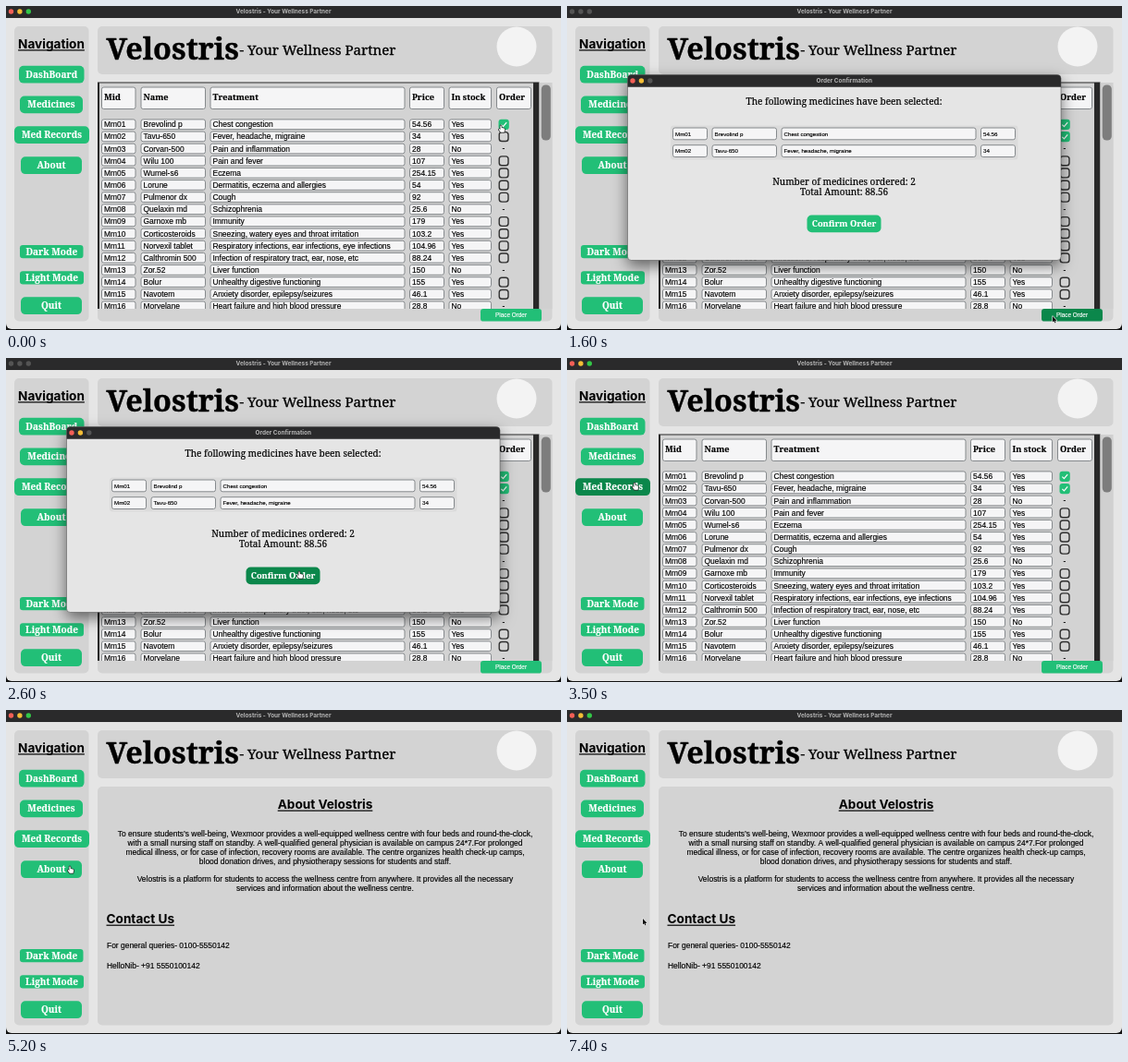
Write an HTML page with a canvas that moves like this. It is 600 px wide and 351 px high and loops after 7.5 s.

```html
<!DOCTYPE html>
<html lang="en">
<head>
<meta charset="utf-8">
<title>Velostris - Your Wellness Partner</title>
<style>
html, body { margin: 0; width: 100%; height: 100%; overflow: hidden; background: #111; }
canvas { display: block; width: 600px; height: 351px; }
</style>
</head>
<body>
<canvas id="stage"></canvas>
<script>
const LOOP = 7500, STEP = 100;
const canvas = document.getElementById('stage');
const ratio = window.devicePixelRatio || 1;
canvas.width = 600 * ratio;
canvas.height = 351 * ratio;
const ctx = canvas.getContext('2d');

const SANS = '"Liberation Sans", Arial, sans-serif';
const UI = 'Inter, Roboto, sans-serif';
const SLAB = '"Noto Serif", "DejaVu Serif", serif';
const GREEN = '#22bf77', DARK_GREEN = '#0b874b', PANEL = '#d3d3d3', PAGE = '#e5e5e5';
const INK = '#000', BAR = '#2a2a2b';
const BRAND = 'Velostris';

// id, name, treatment, price, in stock
const medicines = [
  ['Mm01', 'Brevolind p', 'Chest congestion', '54.56', 'Yes'],
  ['Mm02', 'Tavu-650', 'Fever, headache, migraine', '34', 'Yes'],
  ['Mm03', 'Corvan-500', 'Pain and inflammation', '28', 'No'],
  ['Mm04', 'Wilu 100', 'Pain and fever', '107', 'Yes'],
  ['Mm05', 'Wumel-s6', 'Eczema', '254.15', 'Yes'],
  ['Mm06', 'Lorune', 'Dermatitis, eczema and allergies', '54', 'Yes'],
  ['Mm07', 'Pulmenor dx', 'Cough', '92', 'Yes'],
  ['Mm08', 'Quelaxin md', 'Schizophrenia', '25.6', 'No'],
  ['Mm09', 'Garnoxe mb', 'Immunity', '179', 'Yes'],
  ['Mm10', 'Corticosteroids', 'Sneezing, watery eyes and throat irritation', '103.2', 'Yes'],
  ['Mm11', 'Norvexil tablet', 'Respiratory infections, ear infections, eye infections', '104.96', 'Yes'],
  ['Mm12', 'Calthromin 500', 'Infection of respiratory tract, ear, nose, etc', '88.24', 'Yes'],
  ['Mm13', 'Zor.52', 'Liver function', '150', 'No'],
  ['Mm14', 'Bolur', 'Unhealthy digestive functioning', '155', 'Yes'],
  ['Mm15', 'Navotem', 'Anxiety disorder, epilepsy/seizures', '46.1', 'Yes'],
  ['Mm16', 'Morvelane', 'Heart failure and high blood pressure', '28.8', 'No']
];
const extra = [
  ['Mm71', 'Sulore-f cream', 'Skin inflammtion and itching', '265'],
  ['Mm25', 'Zelmic', 'Heartburn, indigestion', '32.75'],
  ['Mm26', 'Fonarel', 'Headache, toothache, muscle pain and fever', '13'],
  ['Mm27', 'Mulora', 'Acidity and gas', '185'],
  ['Mm58', 'Bentorix', 'Stomach and intestine', '37.5']
];
const byId = new Map([...medicines, ...extra].map(m => [m[0], m.slice(0, 4)]));
const records = [
  ['Mm01', '2022-12-18 06:19:49'], ['Mm09', '2022-12-18 06:40:57'],
  ['Mm10', '2022-12-18 06:40:57'], ['Mm04', '2022-12-18 15:59:04'],
  ['Mm05', '2022-12-18 15:59:04'], ['Mm71', '2022-12-19 06:22:50'],
  ['Mm25', '2022-12-20 06:12:06'], ['Mm26', '2022-12-20 06:12:06'],
  ['Mm27', '2022-12-20 06:12:06'], ['Mm02', '2023-01-07 07:16:14'],
  ['Mm58', '2023-08-24 07:20:28'], ['Mm01', '2023-08-24 10:12:48'],
  ['Mm02', '2023-08-24 10:12:48']
].map(([id, time]) => [...byId.get(id), time]);

// label, x, y, width, height
const navButtons = [
  ['DashBoard', 14, 64.8, 70.5, 18.8], ['Medicines', 15, 97.5, 68, 18.8],
  ['Med Records', 9, 130.3, 81, 18.8], ['About', 16, 163.3, 66, 18.8],
  ['Dark Mode', 15, 259, 68.5, 14.2], ['Light Mode', 15, 287.2, 69, 14.2],
  ['Quit', 16, 315.3, 66, 18.8]
];
const ORDER_BTN = [513, 328.1, 66, 13.5];
const CONFIRM_BTN = [259.5, 226.5, 80, 18.8];

// time, x, y of the pointer
const path = [
  [0, 536, 133], [200, 537, 139], [300, 538, 142], [700, 538, 143], [1300, 525, 336],
  [1700, 525, 336], [2300, 318, 235], [2700, 318, 235], [3300, 74, 139],
  [3900, 74, 139], [4200, 127, 152], [4500, 150, 170], [4700, 142, 174],
  [5000, 70, 173], [5900, 70, 173], [6400, 76, 196], [7100, 82, 226], [7500, 82, 226]
];

function rr(x, y, w, h, r, fill, stroke, line = 1) {
  ctx.beginPath();
  ctx.roundRect(x, y, w, h, r);
  if (fill) { ctx.fillStyle = fill; ctx.fill(); }
  if (stroke) { ctx.strokeStyle = stroke; ctx.lineWidth = line; ctx.stroke(); }
}
function rect(x, y, w, h, fill) {
  ctx.fillStyle = fill;
  ctx.fillRect(x, y, w, h);
}
function dot(x, y, r, fill) {
  ctx.beginPath();
  ctx.arc(x, y, r, 0, Math.PI * 2);
  ctx.fillStyle = fill;
  ctx.fill();
}
// weight adds a thin outline for a slightly heavier face
function text(s, x, y, font, fill = INK, align = 'left', weight = 0) {
  ctx.font = font;
  ctx.textAlign = align;
  ctx.fillStyle = fill;
  ctx.fillText(s, x, y);
  if (!weight) return;
  ctx.strokeStyle = fill;
  ctx.lineWidth = weight;
  ctx.lineJoin = 'round';
  ctx.strokeText(s, x, y);
}
function heading(s, x, y, align = 'center') {
  text(s, x, y, `700 13.6px ${UI}`, INK, align);
  const w = ctx.measureText(s).width;
  rect(align === 'center' ? x - w / 2 : x, y + 1.8, w, 1.2, INK);
}
function button(label, [x, y, w, h], dark, font, drop = 3.4) {
  rr(x, y, w, h, h > 16 ? 5 : 3.2, dark ? DARK_GREEN : GREEN);
  text(label, x + w / 2, y + h / 2 + drop, font, '#fff', 'center', .15);
}
function field(x, y, w, h, s, font, drop) {
  rr(x + .5, y + .5, w - 1, h - 1, 2.2, '#f5f5f6', '#85898c', 1);
  text(s, x + 3, y + h / 2 + drop, font, INK, 'left', .15);
}
function headers(cols, labels, y, h) {
  labels.forEach((s, i) => field(cols[i][0], y, cols[i][1], h, s, `600 9.2px ${SLAB}`, h > 20 ? 2.4 : 3));
}
function row(cols, cells, y) {
  cells.forEach((s, i) => field(cols[i][0], y - 5.8, cols[i][1], 11.7, s, `8.45px ${SANS}`, 3));
}

function titleBar(x, y, w, h, label, lights) {
  const mid = y + h / 2;
  lights.forEach((c, i) => dot(x + 5.5 + i * 9.4, mid, 2.7, c));
  text(label, x + w / 2, mid + 2.2, `700 6.4px ${UI}`, '#b4b4b4', 'center');
}

function frame(t, modal) {
  rect(0, 0, 600, 351, '#111');
  rr(0, 0, 600, 350, [0, 0, 6, 6], PAGE);
  rect(0, 0, 600, 13, BAR);
  const off = '#545454';
  titleBar(0, 0, 600, 12, BRAND + ' - Your Wellness Partner',
    modal ? [off, off, off] : ['#f45f56', '#f4bd35', '#33c748']);
  rr(9, 22, 80.5, 319.5, 5, PANEL);
  rr(99, 22, 491.5, 52, 5, PANEL);
  rr(99, 83, 491.5, 258.5, 5, PANEL);
  heading('Navigation', 49, 45.5);
  for (const [label, ...box] of navButtons) {
    const dark = label === 'Med Records' && t >= 3200 && t < 4300 ||
                 label === 'About' && t >= 5000 && t < 5200;
    button(label, box, dark, `700 10px ${SLAB}`);
  }
  text(BRAND, 108.5, 57.8, `700 32.4px ${SLAB}`, INK, 'left', .4);
  text('- Your Wellness Partner', 252.5, 52.5, `500 15.1px ${SLAB}`, INK, 'left', .3);
  dot(552, 44, 21.5, '#f3f3f3');
}

function checkbox(y, on) {
  if (!on) return rr(533.2, y - 4.7, 9.8, 9.8, 2.8, null, '#303030', 1.4);
  rr(532.5, y - 5.4, 11.3, 11.3, 3, GREEN);
  ctx.beginPath();
  ctx.moveTo(535.4, y + .5);
  ctx.lineTo(537.4, y + 2.5);
  ctx.lineTo(541.2, y - 2);
  ctx.strokeStyle = '#fff';
  ctx.lineWidth = 1.2;
  ctx.stroke();
}

function medicinePage(t) {
  const cols = [[103, 37.5], [145.5, 70.5], [220.5, 211], [436, 38], [478.5, 46.5], [530, 38]];
  rect(99, 82.5, 477.5, 245.5, '#282828');
  rect(101, 83.5, 469, 244.5, PANEL);
  rect(576.5, 83, 14, 245, '#d0d0d0');
  rr(578.8, 85.5, 10, 60, 4.5, '#7d7d7d');
  headers(cols, ['Mid', 'Name', 'Treatment', 'Price', 'In stock', 'Order'], 87.5, 24.5);
  ctx.save();
  ctx.beginPath();
  ctx.rect(99, 83, 478, 245);
  ctx.clip();
  medicines.forEach((m, i) => {
    const y = 128.2 + i * 13.14;
    row(cols, m, y);
    if (m[4] === 'No') text('-', 538, y + 3, `8.45px ${SANS}`, INK, 'center', .15);
    else checkbox(y, i === 0 || i === 1 && t >= 400);
  });
  ctx.restore();
  button('Place Order', ORDER_BTN, t >= 1200 && t < 1900, `6.4px ${SANS}`, 2.2);
}

function recordPage() {
  const cols = [[101.5, 37.5], [144, 70.5], [219, 211], [434.5, 38], [477, 103.5]];
  heading('Medical Records', 341, 106.7);
  headers(cols, ['Mid', 'Name', 'Treatment', 'Price', 'Time of purchase'], 123.5, 15);
  records.forEach((r, i) => row(cols, r, 155 + i * 13.14));
}

function aboutPage() {
  const font = `8.45px ${SANS}`;
  heading('About ' + BRAND, 345, 106.7);
  [
    'To ensure students\u2019s well-being, Wexmoor provides a well-equipped wellness centre with four beds and round-the-clock,',
    'with a small nursing staff on standby. A well-qualified general physician is available on campus 24*7.For prolonged',
    'medical illness, or for case of infection, recovery rooms are available. The centre organizes health check-up camps,',
    'blood donation drives, and physiotherapy sessions for students and staff.',
    '',
    BRAND + ' is a platform for students to access the wellness centre from anywhere. It provides all the necessary',
    'services and information about the wellness centre.'
  ].forEach((s, i) => text(s, 345, 136.8 + i * 9.9, font, INK, 'center', .15));
  heading('Contact Us', 108.5, 230.8, 'left');
  text('For general queries- 0100-5550142', 109, 257.6, font, INK, 'left', .15);
  text('HelloNib- +91 5550100142', 109, 280, font, INK, 'left', .15);
}

function dialog(t) {
  const [x, y, w, h] = [65.5, 74.5, 468.5, 201];
  ctx.save();
  ctx.shadowColor = 'rgba(0,0,0,.55)';
  ctx.shadowBlur = 16 * ratio;
  ctx.shadowOffsetY = 6 * ratio;
  rr(x, y, w, h, 4, PAGE);
  ctx.restore();
  rr(x, y, w, 13.2, [4, 4, 0, 0], BAR);
  titleBar(x, y, w, 13, 'Order Confirmation', ['#f45f56', '#f4bd35', '#545454']);
  rr(x, y, w, h, 4, null, 'rgba(70,70,70,.7)', .7);
  const line = (s, ly) => text(s, 299.5, ly, `500 10px ${SLAB}`, INK, 'center', .2);
  line('The following medicines have been selected:', 107);
  rr(112, 129.5, 375.5, 37, 3, '#dbdbdb');
  const cols = [[114, 38], [156.5, 70.5], [231.5, 211], [447, 38]];
  [0, 1].forEach(i => medicines[i].slice(0, 4).forEach((s, c) =>
    field(cols[c][0], 131.5 + i * 18.7, cols[c][1], 13.8, s, `6.2px ${SANS}`, 2.2)));
  line('Number of medicines ordered: 2', 194);
  line('Total Amount: 88.56', 205.4);
  button('Confirm Order', CONFIRM_BTN, t >= 2200, `700 9.3px ${SLAB}`);
}

function pointerAt(t) {
  const i = path.findIndex((p, k) => k > 0 && t < p[0]);
  const [t0, x0, y0] = path[i - 1], [t1, x1, y1] = path[i];
  const k = (t - t0) / (t1 - t0), e = k * k * (3 - 2 * k);
  return [x0 + (x1 - x0) * e, y0 + (y1 - y0) * e];
}
function inside(x, y, [bx, by, bw, bh]) {
  return x >= bx && x <= bx + bw && y >= by && y <= by + bh;
}
function poly(points, fill, stroke, line) {
  ctx.beginPath();
  points.forEach(([x, y]) => ctx.lineTo(x, y));
  ctx.closePath();
  ctx.lineJoin = 'round';
  ctx.strokeStyle = stroke;
  ctx.lineWidth = line;
  ctx.stroke();
  ctx.fillStyle = fill;
  ctx.fill();
}
function pointer(t, page, modal) {
  const [x, y] = pointerAt(t);
  let hot;
  if (modal) hot = inside(x, y, CONFIRM_BTN);
  else {
    hot = navButtons.some(b => inside(x, y, b.slice(1))) ||
      page === 'medicines' && (inside(x, y, ORDER_BTN) || inside(x, y, [532, 122, 13, 200]));
  }
  ctx.save();
  ctx.translate(x, y);
  if (hot) {
    poly([[-1.6, -3.5], [-.4, -3.5], [-.2, -1], [2.6, -.4], [3.2, .6], [2.6, 3.8],
      [-1.2, 3.8], [-3.4, .8], [-2.8, .1], [-1.6, 1]], '#fff', '#222', 1.3);
  } else if (page === 'records' && inside(x, y, [101, 149, 479, 170])) {
    rect(-.4, -4.5, .8, 9, '#222');
    rect(-1.6, -5, 3.2, .8, '#222');
    rect(-1.6, 4.3, 3.2, .8, '#222');
  } else {
    poly([[0, 0], [0, 6.6], [1.5, 5.3], [2.5, 7.5], [3.5, 7], [2.6, 4.9], [4.5, 4.8]],
      '#111', '#f5f5f5', 1.1);
  }
  ctx.restore();
}

function draw(now) {
  const t = Math.floor((now % LOOP) / STEP) * STEP;
  const modal = t >= 1600 && t < 2700;
  const page = t < 3700 ? 'medicines' : t < 5200 ? 'records' : 'about';
  ctx.setTransform(ratio, 0, 0, ratio, 0, 0);
  frame(t, modal);
  if (page === 'medicines') medicinePage(t);
  else if (page === 'records') recordPage();
  else aboutPage();
  if (modal) dialog(t);
  pointer(t, page, modal);
}

let start;
function tick(now) {
  start ??= now;
  draw(now - start);
  requestAnimationFrame(tick);
}
draw(0);
requestAnimationFrame(tick);
</script>
</body>
</html>
```
